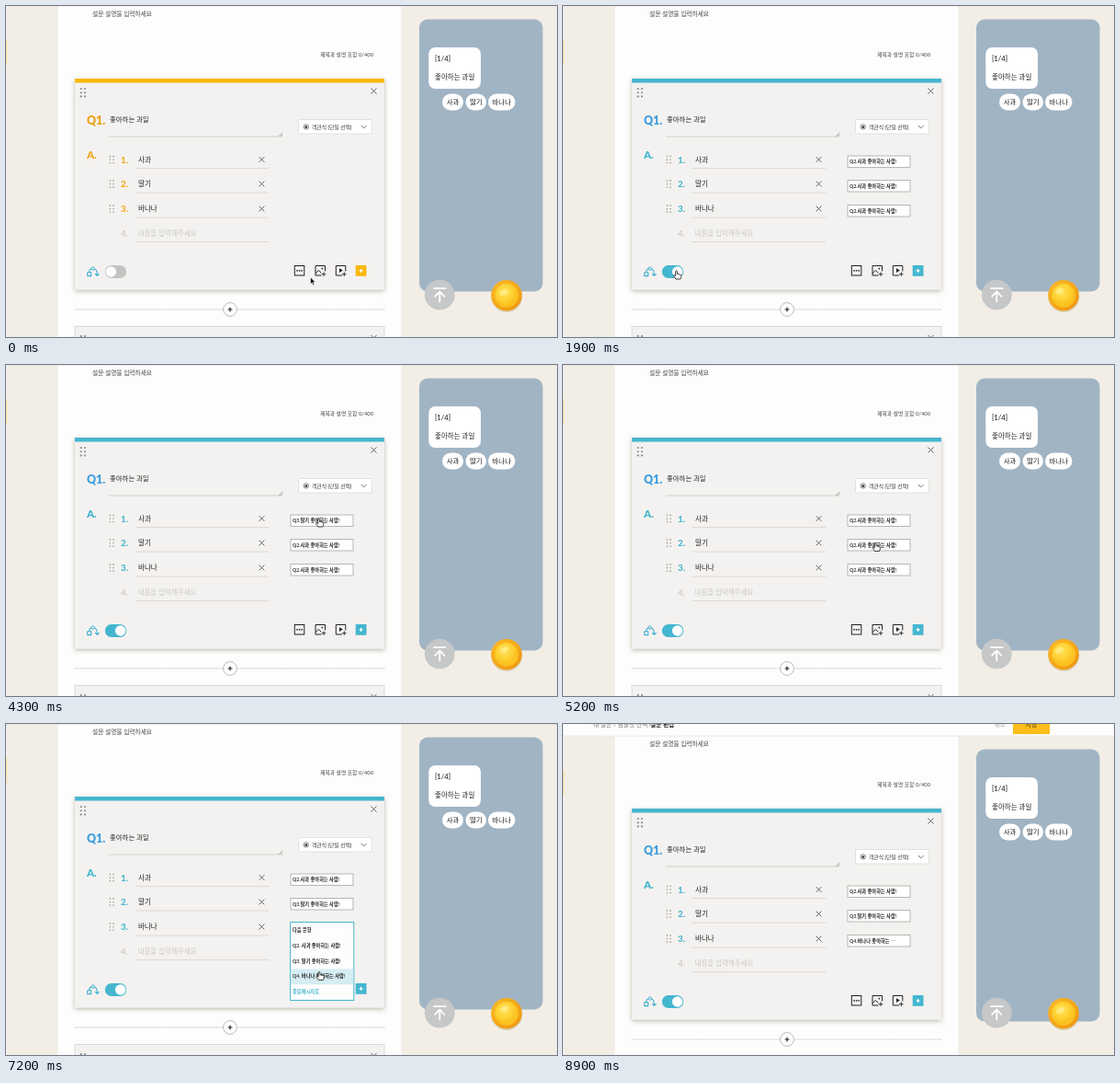
Write an HTML page that moves like this. It is 600 by 360 pixels and loops after 9 s.

```html
<!DOCTYPE html>
<html lang="ko">
<head>
<meta charset="utf-8">
<title>설문 편집</title>
<style>
  html, body { margin: 0; width: 100%; height: 100%; overflow: hidden; background: #f2eee6; }
  svg { display: block; width: 600px; height: 360px; font-family: Lato, "Noto Sans CJK KR", "Noto Sans CJK", sans-serif; --main: #fab90a; --num: #f0a81c; --q: #e9a21b; }
  svg.on { --main: #45b6cf; --num: #45b6cf; --q: #3f9fe0; }
  .main { fill: var(--main); }
  .num { fill: var(--num); }
  .q { fill: var(--q); }
  .line { fill: none; stroke-linecap: round; stroke-linejoin: round; }
</style>
</head>
<body>
<svg id="stage" viewBox="0 0 600 360" xmlns="http://www.w3.org/2000/svg"></svg>
<script>
const LOOP = 9000, STEP = 100;
const TEAL = '#45b6cf', INK = '#222';
const stage = document.getElementById('stage');

// Drawing helpers
const rect = (x, y, w, h, fill, more = '') => `<rect x="${x}" y="${y}" width="${w}" height="${h}" fill="${fill}" ${more}/>`;
const circle = (x, y, r, fill, more = '') => `<circle cx="${x}" cy="${y}" r="${r}" fill="${fill}" ${more}/>`;
const line = (d, color, width = 1, more = '') => `<path class="line" d="${d}" stroke="${color}" stroke-width="${width}" ${more}/>`;
const text = (x, y, size, str, fill = INK, weight = 500, more = '') =>
  `<text x="${x}" y="${y}" font-size="${size}" fill="${fill}" font-weight="${weight}" ${more}>${str}</text>`;
const cross = (x, y, r) => line(`M${x - r} ${y - r}L${x + r} ${y + r}M${x + r} ${y - r}L${x - r} ${y + r}`, '#555', 0.9);
const plus = (x, y, r, color, width) => line(`M${x - r} ${y}H${x + r}M${x} ${y - r}V${y + r}`, color, width);

function grip(x, y, gap, r, color) {
  let dots = '';
  for (let i = 0; i < 6; i++) dots += circle(x + (i % 2) * gap, y + (i >> 1) * gap, r, color);
  return dots;
}

const fruits = ['사과', '딸기', '바나나'];
const rowY = [167, 193.5, 220.5, 247];
const boxY = [163, 189.5, 216.5];
const options = ['다음 문항', ...fruits.map((f, i) => `Q${i + 2}. ${f} 좋아하는 사람!`), '종료메시지로'];
const labels = ['Q2.사과 좋아하는 사람!', 'Q3.딸기 좋아하는 사람!', 'Q4.바나나 좋아하는 ⋯'];
const ROW_H = 16.8;

function backdrop() {
  return rect(0, 0, 600, 400, '#f2eee6') +
    rect(0, 0, 1, 400, '#faf8f4') + rect(0, 37, 1.2, 27, '#fbe3a0') +
    rect(56, 0, 375, 400, '#fdfdfd') +
    line('M56 0V400M431 0V400', '#ebe7e0', 0.6) +
    rect(0, -40, 600, 40, '#fdfdfd') + line('M0 0H600', '#e6e3de', 0.8) +
    text(33, -10.2, 6.7, '내 설문 / 템플릿 선택 /', '#777', 400) +
    text(95, -10.2, 6.7, '설문 편집', INK, 700) +
    text(470, -10.2, 6.5, '취소', '#999', 400) +
    rect(490, -22, 40, 20, '#fcbc1c') +
    text(510, -10, 7, '저장', '#4a3a10', 500, 'text-anchor="middle"') +
    text(94, 10.6, 6.7, '설문 설명을 입력하세요', '#444', 400) +
    text(400, 54.7, 5.8, '제목과 설명 포함 0/400', '#444', 400, 'text-anchor="end"');
}

function card() {
  let s = rect(75, 79, 337, 229.5, '#f4f2f0', 'filter="url(#shade)"') +
    '<rect class="main" x="75" y="79" width="337" height="4.5"/>' +
    grip(81.7, 90, 4.2, 1.05, '#888') + cross(400.5, 92.5, 2.8) +
    text(88, 129, 12.4, 'Q1.', '', 900, 'class="q"') +
    text(113, 125.7, 7.4, '좋아하는 과일') +
    line('M112 142H301', '#c9c7c4', 0.8) + line('M297.5 141.5L301 138M299.5 141.5L301 140', '#777', 0.6) +
    rect(318.5, 123.5, 80, 15.5, '#fff', 'rx="1" stroke="#dcdad7" stroke-width=".8"') +
    circle(326.8, 131.4, 2.7, '#fff', 'stroke="#555" stroke-width=".7"') + circle(326.8, 131.4, 1.5, '#444') +
    text(333, 133.6, 5.8, '객관식 (단일 선택)', '#333') +
    line('M387.2 130.2L389.8 132.8L392.4 130.2', '#555', 0.8) +
    text(88, 166.3, 11.4, 'A.', '', 900, 'class="num"');
  rowY.forEach((y, i) => {
    const name = fruits[i];
    s += line(`M141 ${y + 9.6}H286`, '#d3d1ce', 0.8);
    if (name) {
      s += grip(113.4, y - 3.6, 3.6, 0.85, '#a5a3a0') + cross(278.5, y, 2.6) +
        text(125, y + 3.7, 9.8, `${i + 1}.`, '', 800, 'class="num"') + text(144, y + 2.8, 7.5, name);
    } else {
      s += text(125, y + 3.7, 9.8, '4.', '#cfcdca', 700) + text(143.5, y + 2.8, 7.5, '내용을 입력해주세요', '#cbc9c6', 400);
    }
  });
  return s + tools();
}

function tools() {
  const frame = (x, w = 10.5) => rect(x, 282.5, w, 10.5, 'none', `stroke="${INK}" stroke-width="1"`);
  return line('M88.7 289.8h4v3.8h-4zM90.7 289.5C90.7 287 91.7 286 93 286M96.4 286C98.6 286.5 99.3 289 99.3 293M97.3 291.3L99.3 293.4L101.3 291.3', '#3badd0', 1.1) +
    circle(94.7, 285.6, 1.7, 'none', 'stroke="#3badd0" stroke-width="1"') +
    '<rect id="track" x="107.8" y="282" width="23.4" height="14" rx="7"/>' +
    '<circle id="knob" cy="289" r="5.7" fill="#fff"/>' +
    frame(314.3) + [317, 319.6, 322.2].map(x => circle(x, 287.8, 0.9, INK)).join('') +
    line('M343 293H337V282.5H347.5V288M337.3 290.5L340.3 287.5L343 290', INK, 1) + circle(344.3, 285.6, 0.9, INK) + plus(346, 291.7, 1.9, INK, 0.9) +
    line('M365.5 293H359.3V282.5H369.8V288', INK, 1) + `<path d="M363 285.2V290L366.8 287.6Z" fill="${INK}"/>` + plus(368.3, 291.7, 1.9, INK, 0.9) +
    '<rect class="main" x="380.7" y="282" width="11.8" height="11.8"/>' + plus(386.6, 287.9, 1.5, '#fff', 1.2);
}

function below() {
  return line('M75 330H412', '#aaa', 0.7, 'stroke-dasharray=".6 1.6"') +
    circle(244, 330, 7.4, '#fff', 'stroke="#aaa" stroke-width=".8"') + plus(244, 330, 2, INK, 1.2) +
    rect(75, 348.5, 337, 60, '#f4f2f0', 'stroke="#d5d3d0" stroke-width=".8"') +
    grip(81.7, 359, 4.2, 1.05, '#888') + cross(400.5, 361, 2.8);
}

function phone() {
  const chips = [[475, 23], [500.5, 22.5], [525, 29.5]];
  return rect(450, 14.5, 134.5, 296, '#a1b4c4', 'rx="9"') +
    rect(460.3, 45, 56.7, 45, '#fff', 'rx="7"') +
    text(467, 59.5, 7.7, '[1/4]') + text(467, 80, 7.5, '좋아하는 과일') +
    chips.map(([x, w], i) => rect(x, 95.5, w, 18, '#fff', 'rx="9"') +
      text(x + w / 2, 107.2, 7.4, fruits[i], INK, 500, 'text-anchor="middle"')).join('');
}

function floating() {
  return circle(472.3, 314.2, 16.4, '#c5c7c8') +
    line('M466 307.2H478.6M472.3 321.5V311M467.2 315.8L472.3 310.6L477.4 315.8', '#fff', 1.8) +
    circle(545.3, 316, 17, '#bba77a', 'opacity=".45"') +
    circle(545, 314.7, 16.8, 'url(#rim)') + circle(545, 314.7, 13.2, 'url(#coin)', 'stroke="#f6b31a" stroke-width=".8"') +
    '<ellipse id="glint" rx="5" ry="3.2" fill="#fff3a0" opacity=".55"/>';
}

const selectBox = (y, i) => rect(310, y, 68, 12.5, '#fff', 'stroke="#a8a6a3" stroke-width=".8"') +
  `<text id="pick${i}" x="312" y="${y + 8.1}" font-size="5.25" font-weight="600" fill="${INK}"></text>`;

const menu = () => `<g id="menu">${rect(309.6, 0, 69.2, 85, '#fdfdfd', `stroke="${TEAL}" stroke-width="1"`)}
  <rect id="hover" x="310.2" width="68" height="${ROW_H}" fill="#d5edf3"/>
  ${options.map((o, i) => text(312, 10.4 + i * ROW_H, 5.25, o, i === 4 ? TEAL : INK, 600)).join('')}</g>`;

const HAND = 'M-.9 .8C-.9-.4 .9-.4 .9 .8V3.6C1.3 3 2.4 3.1 2.5 3.9C3 3.4 3.9 3.6 4 4.3C4.6 4 5.3 4.4 5.3 5.2C5.3 7 4.8 7.6 4.4 9H-.6C-1.2 7.8-2.4 6.7-3 5.6C-3.3 4.6-2.2 4.2-1.6 4.9L-.9 5.7Z';
const ARROW = 'M0 0V7.6L1.8 6L3 8.8L4.3 8.2L3.1 5.5H5.5Z';

stage.innerHTML = `<defs>
  <filter id="shade" x="-5%" y="-5%" width="110%" height="112%"><feDropShadow dx="0" dy="1.5" stdDeviation="2.6" flood-color="#5a4a30" flood-opacity=".4"/></filter>
  <linearGradient id="rim" x2="1" y2="1"><stop stop-color="#fbb928"/><stop offset="1" stop-color="#ee940c"/></linearGradient>
  <radialGradient id="coin" cx=".42" cy=".36"><stop stop-color="#ffe45c"/><stop offset=".7" stop-color="#fdd030"/><stop offset="1" stop-color="#fbc220"/></radialGradient>
  </defs>
  <g id="page">${backdrop()}${card()}${below()}${phone()}
    <g id="selects">${boxY.map(selectBox).join('')}</g>${menu()}</g>
  ${floating()}
  <g id="cursor"><path id="arrow" d="${ARROW}" fill="#111" stroke="#fff" stroke-width=".6"/>
    <path id="hand" d="${HAND}" fill="#fff" stroke="#111" stroke-width=".8" stroke-linejoin="round"/></g>`;

// Timeline: [time, x, y] for the pointer tip
const path = [
  [0, 331.5, 295], [300, 331.5, 295], [1200, 123.5, 288], [2000, 123.5, 288],
  [2450, 341, 167], [2650, 341, 167], [2950, 343.5, 188], [3200, 343.5, 188],
  [3500, 341, 204], [3850, 341, 204], [4200, 340.5, 167], [4450, 340.5, 167],
  [4750, 342, 187], [4950, 342, 187], [5250, 340, 194], [5400, 340, 194],
  [5800, 337, 227], [6150, 337, 227], [6350, 338, 221], [6550, 338, 221],
  [7000, 341, 269.5], [7450, 341, 269.5], [8200, 440, -14], [LOOP, 440, -14]
];
const TOGGLE = 1500;
const picks = [[0, 0, 0], [3800, 0, 1], [4900, 0, 0], [6000, 1, 1], [7400, 2, 2]];
const menus = [[2600, 3800, 0], [4400, 4900, 0], [5350, 6000, 1], [6500, 7400, 2]];

const clamp = v => Math.min(1, Math.max(0, v));
const ease = v => v * v * (3 - 2 * v);
const $ = id => document.getElementById(id);
const set = (id, attrs) => { for (const k in attrs) $(id).setAttribute(k, attrs[k]); };
const show = (id, on) => { $(id).style.display = on ? '' : 'none'; };

function pointer(t) {
  const i = Math.max(1, path.findIndex(p => p[0] > t));
  const [t0, x0, y0] = path[i - 1], [t1, x1, y1] = path[i];
  const k = ease(clamp((t - t0) / (t1 - t0)));
  return [x0 + (x1 - x0) * k, y0 + (y1 - y0) * k];
}

function draw(t) {
  const [x, y] = pointer(t);
  const on = t >= TOGGLE;
  const slide = on ? ease(clamp((t - TOGGLE + STEP) / 200)) : 0;
  const scroll = 13 * ease(clamp((t - 7600) / 400));

  stage.classList.toggle('on', on);
  set('track', { fill: on ? TEAL : '#c4c3c2' });
  set('knob', { cx: 114.4 + 10.2 * slide });
  set('page', { transform: `translate(0 ${scroll})` });

  const chosen = [0, 0, 0];
  for (const [at, box, value] of picks) if (t >= at) chosen[box] = value;
  chosen.forEach((v, i) => { $('pick' + i).textContent = labels[v]; });
  show('selects', on);

  const open = menus.find(([from, to]) => t >= from && t < to);
  show('menu', open);
  if (open) {
    const top = boxY[open[2]] - 1;
    const row = Math.floor((y + 2 - top) / ROW_H);
    set('menu', { transform: `translate(0 ${top})` });
    set('hover', { y: 0.6 + row * ROW_H });
    show('hover', row >= 0 && row < 5);
  }

  const overToggle = t >= 1100 && t < 2100;
  const hand = overToggle || (t >= 2400 && t < 7500);
  show('hand', hand);
  show('arrow', !hand);
  set('cursor', { transform: `translate(${x} ${y})` });

  const a = t / LOOP * Math.PI * 6;
  set('glint', { transform: `translate(${542 + 2 * Math.sin(a)} ${310.5 + Math.cos(a)}) rotate(-25)` });
}

function tick() {
  draw(Math.floor(performance.now() % LOOP / STEP) * STEP);
  requestAnimationFrame(tick);
}
tick();
</script>
</body>
</html>
```
